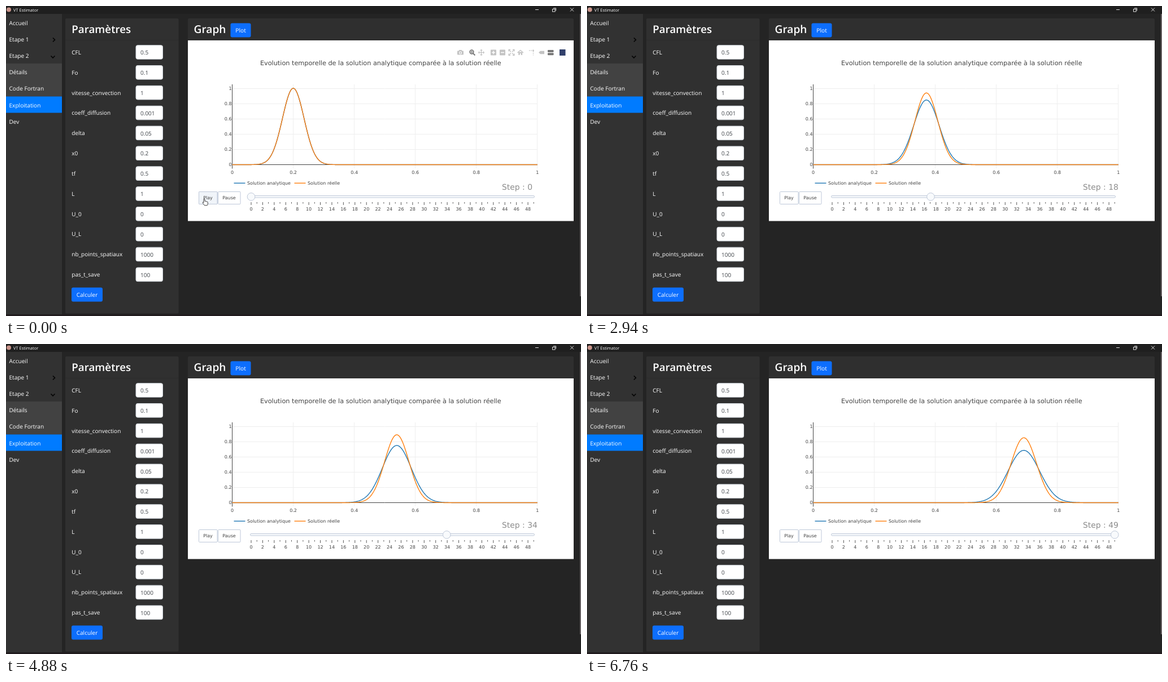
Write an HTML page with a canvas that moves like this. It is 1018 px wide and 550 px high and loops after 7.96 s.

```html
<!DOCTYPE html>
<html lang="fr">
<head>
<meta charset="utf-8">
<title>VT Estimator</title>
<style>
html, body { margin: 0; width: 100%; height: 100%; overflow: hidden; background: #242424; }
canvas, svg { position: absolute; left: 0; top: 0; width: 1018px; height: 550px; }
text { text-rendering: geometricPrecision; white-space: pre; }
.ui { font-family: "Open Sans", "Noto Sans", sans-serif; }
.plot { font-family: "DejaVu Sans", Verdana, sans-serif; }
</style>
</head>
<body>
<canvas id="stage" width="1018" height="550"></canvas>
<svg id="labels" viewBox="0 0 1018 550"></svg>
<script>
const LOOP = 7960, FRAME = 69.34, ANCHOR = 1490;
const STEPS = 49;
const X0 = 400.5, XW = 540.4, Y0 = 281.5, YH = 135.5;
const RAIL = 434, PITCH = 10.21;
const BLUE = '#1f77b4', ORANGE = '#ff7f0e', EDGE = '#bec8d9';

// Playback progress: [time in ms, step]
const PACE = [[897, 0], [1143, 2.08], [2252.7, 11.46], [3639.5, 23.1],
              [4333, 29.05], [5508, 38.95], [6760, 49]];

const svg = document.getElementById('labels');
const screen = document.getElementById('stage').getContext('2d');
const backdrop = document.createElement('canvas');
backdrop.width = 1018;
backdrop.height = 550;
let ctx = backdrop.getContext('2d');

const clamp = v => Math.max(0, Math.min(1, v));
const smooth = v => v * v * (3 - 2 * v);
const cubic = v => v < .5 ? 4 * v ** 3 : 1 - 4 * (1 - v) ** 3;

function node(tag, attrs) {
  const el = document.createElementNS('http://www.w3.org/2000/svg', tag);
  for (const k in attrs) el.setAttribute(k, attrs[k]);
  svg.append(el);
  return el;
}

function label(str, x, y, size, fill, cls = 'ui', anchor = 'start', weight = 400) {
  const el = node('text', { x, y, fill, class: cls, 'font-size': size,
    'text-anchor': anchor, 'font-weight': weight });
  el.textContent = str;
  return el;
}

function rect(x, y, w, h, fill) {
  ctx.fillStyle = fill;
  ctx.fillRect(x, y, w, h);
}

function box(x, y, w, h, r, fill, stroke) {
  ctx.beginPath();
  ctx.roundRect(x, y, w, h, r);
  ctx.fillStyle = fill;
  ctx.fill();
  if (stroke) {
    ctx.strokeStyle = stroke;
    ctx.lineWidth = 1;
    ctx.stroke();
  }
}

function line(color, width, ...pts) {
  ctx.beginPath();
  for (let i = 0; i < pts.length; i += 2) ctx.lineTo(pts[i], pts[i + 1]);
  ctx.strokeStyle = color;
  ctx.lineWidth = width;
  ctx.stroke();
}

function disc(x, y, r, fill) {
  ctx.beginPath();
  ctx.arc(x, y, r, 0, 7);
  ctx.fillStyle = fill;
  ctx.fill();
}

function drawWindow() {
  rect(0, 0, 1018, 550, '#242424');
  rect(0, 0, 1018, 14, '#1f1f1f');
  disc(5, 6.5, 4, '#c9948a');
  label('VT Estimator', 13, 9.5, 7.5, '#fff');
  line('#ddd', 1, 937, 6.5, 943, 6.5);
  ctx.strokeRect(967.5, 5.5, 4.5, 4.5);
  line('#ddd', 1, 969, 3.8, 973.6, 3.8, 973.6, 8.5);
  line('#ddd', 1, 999, 3.5, 1005, 9.5);
  line('#ddd', 1, 1005, 3.5, 999, 9.5);
  rect(1016, 14, 2, 501, '#6c6668');
  rect(0, 547, 1018, 3, '#211c1e');
}

function drawSidebar() {
  rect(0, 14, 99, 533, '#323232');
  rect(0, 102, 99, 58.5, '#424242');
  rect(0, 160.5, 99, 29, '#007bff');
  ['Accueil', 'Etape 1', 'Etape 2', 'Détails', 'Code Fortran', 'Exploitation', 'Dev']
    .forEach((s, i) => label(s, 5.5, 33.5 + 29.2 * i, 10.1, '#fff'));
  line('#050505', 1.7, 83, 56.5, 86.5, 60, 83, 63.5);
  line('#050505', 1.7, 79.5, 88.5, 83, 92, 86.5, 88.5);
}

function drawForm() {
  box(105, 22, 200.5, 523.5, 2, '#303030');
  rect(105, 60, 200.5, 1, '#2b2b2b');
  label('Paramètres', 116.3, 48, 18.8, '#fff', 'ui', 'start', 600);
  [['CFL', '0.5'], ['Fo', '0.1'], ['vitesse_convection', '1'], ['coeff_diffusion', '0.001'],
   ['delta', '0.05'], ['x0', '0.2'], ['tf', '0.5'], ['L', '1'], ['U_0', '0'], ['U_L', '0'],
   ['nb_points_spatiaux', '1000'], ['pas_t_save', '100']].forEach(([name, value], i) => {
    const y = 82 + 35.85 * i;
    label(name, 116.3, y + 3.8, 10.03, '#fff');
    box(230, y - 12.3, 47.5, 24.6, 3, '#fff', '#ced4da');
    label(value, 238, y + 4.2, 10, '#3c4146');
  });
  box(116, 499.5, 55, 25, 3, '#0d6efd');
  label('Calculer', 143.5, 515.8, 10, '#fff', 'ui', 'middle');
}

function drawChart() {
  box(322, 22, 683, 42, 2, '#2f2f2f');
  label('Graph', 332.6, 48, 19.1, '#fff', 'ui', 'start', 600);
  box(397.5, 30.5, 36, 25, 3, '#0d6efd');
  label('Plot', 415.5, 47, 10.2, '#fff', 'ui', 'middle');
  rect(322, 61, 683, 320.5, '#fff');
  label('Evolution temporelle de la solution analytique comparée à la solution réelle',
    663.3, 105.2, 11.28, '#444', 'plot', 'middle');

  for (let i = 0; i <= 5; i++) {
    const x = X0 + XW * i / 5, y = Y0 - YH * i / 5, s = String(i / 5);
    if (i) {
      line('#eee', 1, Math.floor(x) + .5, 139, Math.floor(x) + .5, 288);
      line('#eee', 1, X0, Math.floor(y) + .5, X0 + XW, Math.floor(y) + .5);
    }
    label(s, x, 297.8, 8, '#444', 'plot', 'middle');
    label(s, 399.5, y + 2.8, 8, '#444', 'plot', 'end');
  }
  line('#444', 1, X0, 139, X0, 288.5);
  line('#444', 1, X0, Y0, X0 + XW, Y0);

  line(BLUE, 1.4, 403.5, 314.3, 423.5, 314.3);
  line(ORANGE, 1.4, 510.5, 314.3, 530.5, 314.3);
  label('Solution analytique', 427, 317.2, 7.96, '#444', 'plot');
  label('Solution réelle', 534, 317.2, 7.96, '#444', 'plot');

  box(341.5, 329.5, 32.5, 22, 1, '#fff', EDGE);
  box(375.5, 329.5, 39.5, 22, 1, '#fff', EDGE);
  label('Play', 357.5, 342.9, 8, '#444', 'plot', 'middle');
  label('Pause', 395, 342.9, 8, '#444', 'plot', 'middle');

  box(432.5, 336.5, 503, 3.5, 1.7, '#f8fafc', EDGE);
  for (let i = 0; i <= STEPS; i++) {
    const x = RAIL + PITCH * i, even = i % 2 === 0;
    line('#444', .9, x, 348, x, even ? 353 : 350.6);
    if (even) label(i, x, 363.3, 8, '#444', 'plot', 'middle');
  }
}

function drawToolbar(alpha) {
  if (alpha <= 0) return;
  const soft = '#c3c3c3', dark = '#757575', y = 82.5;
  ctx.globalAlpha = alpha;

  // camera
  box(799, y - 3, 11, 7, 1, soft);
  rect(802, y - 4.5, 5, 2, soft);
  disc(804.5, y + .5, 2.5, '#fff');
  disc(804.5, y + .5, 1.5, soft);

  // zoom
  ctx.beginPath();
  ctx.arc(824.5, y - 1, 3.3, 0, 7);
  ctx.strokeStyle = dark;
  ctx.lineWidth = 1.7;
  ctx.stroke();
  line(dark, 2, 827, y + 1.6, 830.4, y + 5);
  line(dark, 1, 822.5, y - 1, 826.5, y - 1);
  line(dark, 1, 824.5, y - 3, 824.5, y + 1);

  // pan
  line(soft, 1.2, 836.5, y, 846.5, y);
  line(soft, 1.2, 841.5, y - 5, 841.5, y + 5);
  for (const [dx, dy] of [[1, 0], [-1, 0], [0, 1], [0, -1]]) {
    const px = 841.5 + 3.4 * dx, py = y + 3.4 * dy;
    line(soft, 1.1, px - 1.8 * dy, py - 1.8 * dx, px + 1.6 * dx, py + 1.6 * dy,
      px + 1.8 * dy, py + 1.8 * dx);
  }

  // zoom in, zoom out
  for (const x of [863, 879]) {
    box(x - 5, y - 5, 10, 10, 1, soft);
    line('#fff', 1.5, x - 3, y, x + 3, y);
  }
  line('#fff', 1.5, 863, y - 3, 863, y + 3);

  // autoscale
  for (const sx of [-1, 1]) for (const sy of [-1, 1]) {
    line(soft, 1.3, 895 + 5 * sx, y + 2 * sy, 895 + 5 * sx, y + 5 * sy, 895 + 2 * sx, y + 5 * sy);
    line(soft, 1.3, 895 + sx, y + sy, 895 + 4 * sx, y + 4 * sy);
  }

  // home
  line(soft, 1.4, 905.5, y + .5, 910.7, y - 4, 916, y + .5);
  rect(907.3, y, 2.4, 4.5, soft);
  rect(911.7, y, 2.4, 4.5, soft);
  rect(907.3, y - .8, 6.8, 2.2, soft);

  // spike lines
  ctx.setLineDash([1.6, 1.4]);
  line(soft, 1.3, 926, y - 3.5, 933.5, y - 3.5, 933.5, y + 5);
  ctx.setLineDash([]);
  disc(933.5, y - 3.5, 1.4, soft);

  // hover labels
  const tag = (top, h, color) => {
    ctx.beginPath();
    for (const [x, v] of [[943, .5], [946, 0], [953, 0], [953, 1], [946, 1]]) ctx.lineTo(x, top + v * h);
    ctx.fillStyle = color;
    ctx.fill();
  };
  tag(y - 2.7, 5.5, soft);
  box(959, y - 4.5, 10.5, 4, 1, dark);
  box(959, y + .8, 10.5, 4, 1, dark);

  rect(980, 77, 10.5, 11, '#31406b');
  ctx.globalAlpha = 1;
}

// Spreading pulse after p steps
function pulse(p, rate, color) {
  const spread = 1 + rate * p, mid = .2 + .01 * p;
  ctx.beginPath();
  for (let i = 0; i <= 540; i++) {
    const x = i / 540;
    const v = Math.exp(-((x - mid) ** 2) / (.0025 * spread)) / Math.sqrt(spread);
    ctx.lineTo(X0 + XW * x, Y0 - YH * v);
  }
  ctx.strokeStyle = color;
  ctx.lineWidth = 1.4;
  ctx.lineJoin = 'round';
  ctx.stroke();
}

function progress(t) {
  if (t <= PACE[0][0]) return 0;
  for (let i = 1; i < PACE.length; i++) {
    const [a, u] = PACE[i - 1], [b, v] = PACE[i];
    if (t < b) return u + (v - u) * (t - a) / (b - a);
  }
  return STEPS;
}

drawWindow();
drawSidebar();
drawForm();
drawChart();
const counter = label('Step : 0', 878, 326, 13.9, '#8c8c8c', 'plot');
const pen = { fill: '#fff', stroke: '#111', 'stroke-width': .8, 'stroke-linejoin': 'round' };
const hand = node('path', { ...pen,
  d: 'M-1 .8Q0-.8 1 .8V4.3Q2.2 3.6 3 4.8Q4.2 4.2 4.8 5.3Q6.2 5 6.3 6.6V9Q6 10.4 5.2 11.8H.4Q-.8 10-2.6 7.6Q-3.4 6.2-2.2 6Q-1.6 6-1 6.9Z' });
const arrow = node('path', { ...pen, 'stroke-width': .6,
  d: 'M0 0V8.6L2 6.8L3.4 9.9L4.9 9.2L3.5 6.3H6.2Z' });
ctx = screen;

function render(now) {
  const t = now % LOOP;
  const tick = ANCHOR + FRAME * Math.floor((t - ANCHOR + 14) / FRAME);
  const u = progress(tick), whole = Math.floor(u);
  const p = whole + cubic(u - whole);

  ctx.drawImage(backdrop, 0, 0);
  drawToolbar(1 - smooth(clamp((tick - 880) / 300)));
  pulse(p, .0231, BLUE);
  pulse(p, .00784, ORANGE);

  ctx.beginPath();
  ctx.arc(RAIL + PITCH * p, 338.4, 6.8, 0, 7);
  ctx.fillStyle = '#f8fafc';
  ctx.fill();
  ctx.strokeStyle = EDGE;
  ctx.lineWidth = 1;
  ctx.stroke();
  counter.textContent = 'Step : ' + Math.ceil(u);

  const move = smooth(clamp((tick - 650) / 610));
  const x = 351 + 215 * move, y = 342 + 192.6 * move;
  const over = y < 351.5;
  if (over) box(341.5, 329.5, 32.5, 22, 1, '#f0f4f9', EDGE);
  hand.style.display = over ? '' : 'none';
  arrow.style.display = !over && tick < 1300 ? '' : 'none';
  (over ? hand : arrow).setAttribute('transform', `translate(${x} ${y})`);
}

let start;
function loop(now) {
  start ??= now;
  render(now - start);
  requestAnimationFrame(loop);
}
render(0);
requestAnimationFrame(loop);
</script>
</body>
</html>
```
